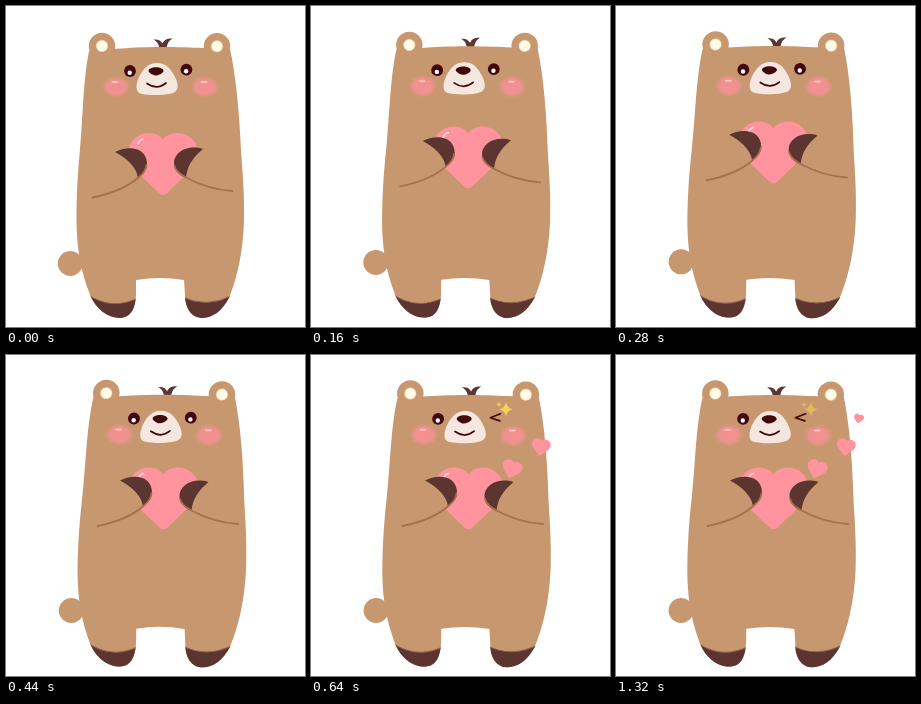
Animation, 299 px wide and 321 px high, one loop 1.4 s. Source, as an HTML page:

```html
<!DOCTYPE html>
<html lang="en">
<head>
<meta charset="utf-8">
<title>Bear with a heart</title>
<style>
  html, body { margin: 0; width: 100%; height: 100%; overflow: hidden; background: #fff; }
  svg { display: block; width: 100%; height: 100%; }
  .fur { fill: #c7976f; }
  .paw { fill: #5c3430; }
  .ink { fill: #42070b; }
  .love { fill: #ff949f; }
  .line { fill: none; stroke: #a5714c; stroke-width: 1.8; stroke-linecap: round; }
  .stroke { fill: none; stroke: #42070b; stroke-width: 1.7; stroke-linecap: round; stroke-linejoin: round; }
</style>
</head>
<body>
<svg viewBox="0 0 299 321">
  <defs>
    <path id="heart" d="M0 -21C-6 -30 -21 -30 -29 -22C-38 -13 -36 0 -27 10L-4 32Q0 36 4 32L27 10C36 0 38 -13 29 -22C21 -30 6 -30 0 -21Z"/>
    <path id="torso" d="M83 45C95 44.500 120 41 155 41C190 41 210 43 224 43C230 70 233.500 108 235 145C237 172 238.500 190 238 215C237 247 231 272 223 292C216 305 207 312 195 312C183 310.500 179 299 179 289L178 274Q154 270 130 274L130 288C129.500 301 126 311.500 114 312C101 312 90 302 85 291C78 273 71 252 70.500 215C70.500 185 72 165 74 143C77 110 77 75 83 45Z"/>
    <clipPath id="inside"><use href="#torso"/></clipPath>
    <radialGradient id="rosy">
      <stop offset="0" stop-color="#f58f91"/>
      <stop offset=".65" stop-color="#f09290" stop-opacity=".95"/>
      <stop offset="1" stop-color="#e59684" stop-opacity="0"/>
    </radialGradient>
    <radialGradient id="cream">
      <stop offset=".78" stop-color="#fffbe4"/>
      <stop offset="1" stop-color="#f0dcae" stop-opacity=".5"/>
    </radialGradient>
    <g id="eye">
      <circle class="ink" r="5.9"/>
      <circle cx="-.3" cy="1.7" r="2.2" fill="#fff"/>
    </g>
    <g id="cheek">
      <ellipse rx="14.5" ry="11.5" fill="url(#rosy)"/>
      <ellipse cx="-1" cy="-5" rx="3.5" ry="1" fill="#ffd5ce" opacity=".8"/>
    </g>
    <g id="ear">
      <circle class="fur" r="13.2"/>
      <circle r="6.2" fill="url(#cream)"/>
    </g>
  </defs>

  <circle id="tail" class="fur" r="12.5"/>
  <g id="bear">
    <path class="paw" d="M153.500 43C153 38 151 35.500 147.500 33.500C152 33 155 34.500 156.500 37.500C158 33.500 161.500 32 166.500 32.500C162.500 35 161 38 160.500 43Z"/>
    <use href="#torso" class="fur"/>
    <use href="#ear" x="96" y="40"/>
    <use href="#ear" x="211" y="40.300"/>
    <g clip-path="url(#inside)" class="paw" stroke="#8f5f48" stroke-width="1">
      <path d="M80 287.500Q106 306 134 291V316H80Z"/>
      <path d="M174 289.500Q200 304 228 288.500V316H174Z"/>
    </g>
    <use href="#cheek" x="110" y="81"/>
    <use href="#cheek" x="199" y="81"/>
    <path fill="#f3e7df" d="M151 57C160 57 165 63 169 71C172.500 78 173 83.500 168 86.500C160 89.800 142 89.800 134 87.500C129 85 130 78 133 71C137 63 142 57 151 57Z"/>
    <path class="ink" d="M142.500 65C143 60 157 60 157.500 65C157 67 153 69.500 150 69.500C147 69.500 143 67 142.500 65Z"/>
    <path class="stroke" d="M141 77.500Q151 84.500 160 77"/>
    <use href="#eye" x="124" y="65"/>
    <use id="open" href="#eye" x="180.400" y="63.600"/>
    <path id="wink" class="stroke" d="M186 59.500L176 63.500L185.500 66.500"/>
  </g>

  <g id="gift">
    <use href="#heart" class="love" x="157" y="155"/>
    <path d="M132 138Q133 134 137 133" fill="none" stroke="#ffe3e3" stroke-width="1.6" stroke-linecap="round"/>
  </g>
  <g id="left">
    <path class="fur" d="M109 146C122 139 141 141 141 158C141 164 137 168 132 172C120 183 103 189 86 192Z"/>
    <path class="paw" d="M109 146C122 139 141 141 141 158C141 164 137 168 132 172C131 162 121 152 109 146Z"/>
    <path class="line" d="M86.500 191.500C104 188 122 181 133 171C138 167 140 163 140.500 159"/>
  </g>
  <g id="right">
    <path class="fur" d="M197 143C182 138 168 146 168 157C168 165 174 169 181 172C195 180 210 184 227 185Z"/>
    <path class="paw" d="M197 143C182 138 168 146 168 157C168 164 173 169 180 172C181 161 186 152 197 143Z"/>
    <path class="line" d="M168.500 160C170 166 175 169 181 172C196 180 210 184 226.500 185"/>
  </g>

  <g id="star" fill="#f9cf55">
    <path d="M195 46.500Q195.800 53.200 202 54.300Q195.800 55.400 195 62Q194.200 55.400 188 54.300Q194.200 53.200 195 46.500Z"/>
    <path d="M188 46.500L189 48.500L191 49.500L189 50.500L188 52.500L187 50.500L185 49.500L187 48.500Z" opacity=".8"/>
  </g>
  <use id="near" href="#heart" class="love" transform="translate(201 113.500) rotate(18) scale(.29)"/>
  <use id="mid" href="#heart" class="love" transform="translate(230 91.500) rotate(10) scale(.27)"/>
  <use id="far" href="#heart" class="love" transform="translate(242.800 63.300) rotate(14) scale(.145)"/>
</svg>
<script>
  const LOOP = 1400, STEP = 40;
  const PIVOT = { x: 153, y: 300 };
  const $ = id => document.getElementById(id);
  const clamp = v => Math.max(0, Math.min(1, v));
  const move = (id, x, y) => $(id).setAttribute('transform', `translate(${x} ${y})`);
  const show = (id, on) => $(id).setAttribute('visibility', on ? 'visible' : 'hidden');

  function draw(ms) {
    const t = Math.floor(ms % LOOP / STEP) * STEP;
    const lift = Math.sin(clamp(t / 440) * Math.PI / 2);
    const lean = lift - 0.22 * clamp((t - 440) / 200);

    // The body leans, tilts and stretches about a point between the feet.
    const wide = 1 + 0.006 * lean, tilt = 0.01 * lean;
    const skew = -0.0177 * lean, tall = 1 + 0.005 * lean;
    $('bear').setAttribute('transform',
      `translate(${PIVOT.x} ${PIVOT.y}) matrix(${wide} ${tilt} ${skew} ${tall} 0 0) translate(${-PIVOT.x} ${-PIVOT.y})`);
    move('tail', 64.3 + lean, 257.5 - 2 * lift);
    move('gift', 0.5 * lift, -14.5 * lift ** 1.3);
    move('left', 5 * lift, -20.5 * lift);
    move('right', 5.5 * lift, -16 * lift);

    const winking = t >= 600;
    show('open', !winking);
    show('wink', winking);
    show('star', winking);
    show('near', winking);
    show('mid', t >= 640);
    show('far', t >= 920);
    $('star').setAttribute('opacity', 1 - 0.22 * clamp((t - 1240) / 40) - 0.18 * clamp((t - 1280) / 40));
  }

  const start = performance.now();
  function tick() {
    draw(performance.now() - start);
    requestAnimationFrame(tick);
  }
  tick();
</script>
</body>
</html>
```
